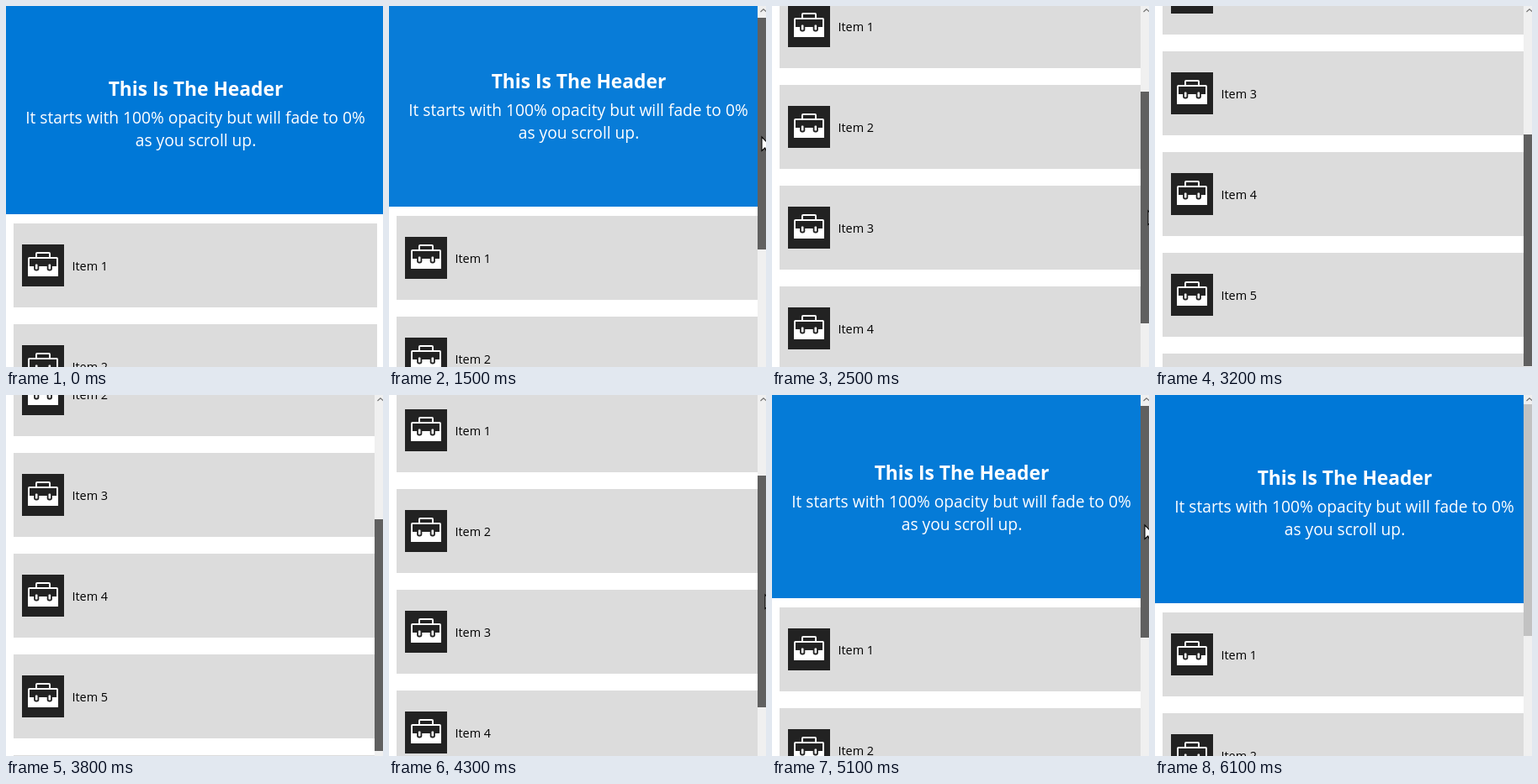
An HTML page that plays this animation: 448x430 px, repeating every 6.2 s.

```html
<!DOCTYPE html>
<html lang="en">
<head>
<meta charset="utf-8">
<title>Fading header</title>
<style>
  html, body { margin: 0; width: 100%; height: 100%; overflow: hidden; background: #fff; }
  svg { display: block; font-family: "Open Sans", "Noto Sans", sans-serif; }
  #header text { fill: #fff; text-anchor: middle; font-size: 19.2px; }
  #header .title { font-size: 22.8px; font-weight: 700; }
  #list text { fill: #000; font-size: 14.4px; }
</style>
</head>
<body>
<svg width="448" height="430" viewBox="0 0 448 430">
  <defs>
    <g id="toolbox">
      <rect width="50" height="50" fill="#222"/>
      <g fill="none" stroke="#fff" stroke-width="2">
        <path d="M17 15V11Q17 10 18 10H32Q33 10 33 11V15"/>
        <rect x="8" y="16" width="34" height="21" rx="1"/>
      </g>
      <path d="M7 26H43V38H7Z" fill="#fff"/>
      <g fill="#fff" stroke="#222" stroke-width="1.8">
        <rect id="clasp" x="15" y="22.5" width="4.4" height="8" rx="1.8"/>
        <use href="#clasp" x="15.6"/>
      </g>
    </g>
  </defs>
  <g id="page">
    <g id="header">
      <rect width="448" height="248" fill="#0078d7"/>
      <text class="title" x="225.5" y="107">This Is The Header</text>
      <text x="225" y="140">It starts with 100% opacity but will fade to 0%</text>
      <text x="225.5" y="167">as you scroll up.</text>
    </g>
    <g id="list"></g>
  </g>
  <g id="bar">
    <rect x="438" width="10" height="430" fill="#f0f0f0"/>
    <path d="M441.5 7L445 3.8L448.5 7" fill="none" stroke="#707070" stroke-width="1.1"/>
    <rect id="thumb" x="438" width="10" height="276"/>
  </g>
  <path id="cursor" d="M0 0V16.5L3.8 13L6.2 18.6L8.6 17.6L6.2 12.1H11.5Z" fill="#fff" stroke="#000" stroke-width="1.1"/>
</svg>
<script>
const LOOP = 6200, STEP = 100;
const MAX_SCROLL = 450, FADE = 249;
const el = id => document.getElementById(id);
const [page, header, bar, thumb, cursor] = ["page", "header", "bar", "thumb", "cursor"].map(el);

el("list").innerHTML = Array.from({ length: 6 }, (_, i) => `
  <g transform="translate(0 ${259 + 120 * i})">
    <rect x="9" width="432" height="100" fill="#dcdcdc"/>
    <use href="#toolbox" x="19" y="25"/>
    <text x="78.5" y="56">Item ${i + 1}</text>
  </g>`).join("");

// Progress from 0 to 1 between two times, straight or eased
const ramp = (t, from, to) => Math.min(1, Math.max(0, (t - from) / (to - from)));
const ease = (t, from, to) => Math.sin(ramp(t, from, to) * Math.PI / 2) ** 2;

const move = (node, x, y) => node.setAttribute("transform", `translate(${Math.round(x)} ${Math.round(y)})`);
const show = (node, on) => node.setAttribute("visibility", on ? "visible" : "hidden");

function draw(now) {
  const t = Math.floor(now % LOOP / STEP) * STEP;

  // Drag the page down, then back up
  const scroll = Math.round(MAX_SCROLL * (ease(t, 1318, 3333) - ease(t, 3575, 5221)));
  move(page, 0, -scroll);
  header.setAttribute("opacity", Math.max(0, 1 - scroll / FADE));

  const thumbY = Math.round(11 + scroll * 0.319);
  thumb.setAttribute("y", thumbY);
  thumb.setAttribute("fill", t >= 1300 && t < 5600 ? "#606060" : "#c2c2c2");
  show(bar, t >= 1000);

  // The pointer arrives, follows the thumb and slips off to the right
  const enter = ramp(t, 900, 1300), leave = ramp(t, 5200, 5600);
  const drift = 6 * scroll / MAX_SCROLL;
  move(cursor, 323 + 120 * enter + drift + 10 * leave, thumbY + 142 + 255 * (1 - enter));
  show(cursor, t >= 900 && t < 5600);
}

function tick() {
  draw(performance.now());
  requestAnimationFrame(tick);
}
tick();
</script>
</body>
</html>
```
